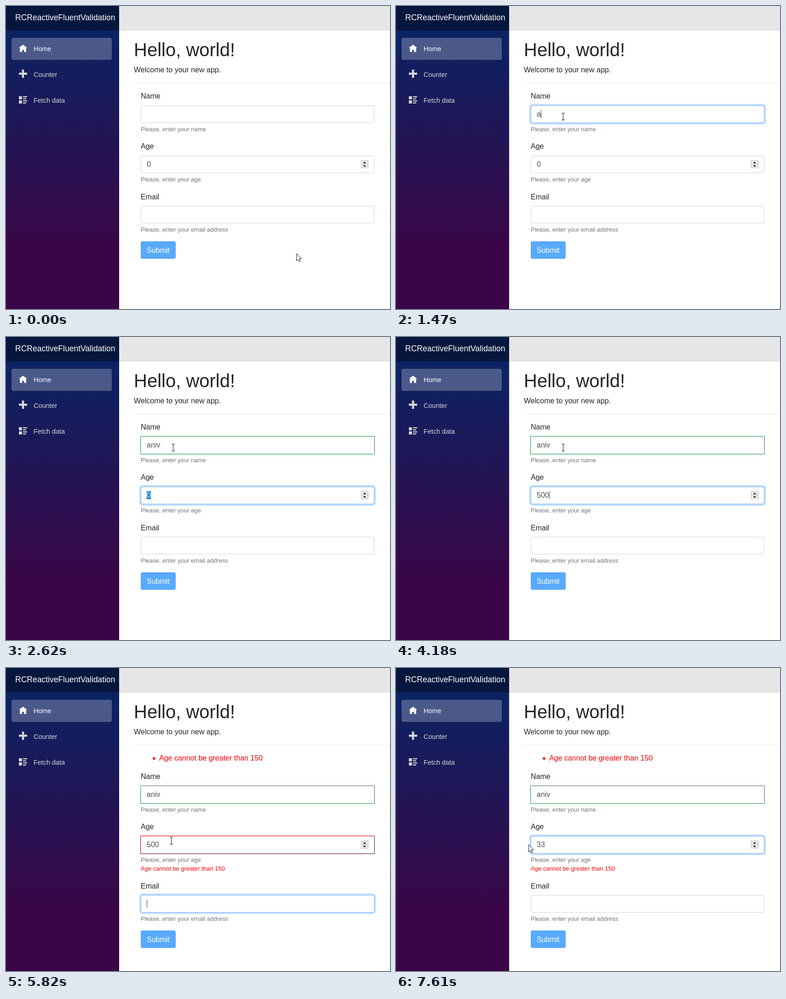
These frames come from a looping animation (835 px wide and 658 px high, 8 s). An HTML page:

```html
<!DOCTYPE html>
<html lang="en">
<head>
<meta charset="utf-8">
<title>Form validation</title>
<style>
  html, body { margin: 0; width: 100%; height: 100%; overflow: hidden; background: #fff; }
  svg { display: block; width: 835px; height: 658px; font: 16px "Liberation Sans", Arial, sans-serif; fill: #212529; }
  .small { font-size: 13px; fill: #6c757d; }
  .error { fill: red; }
  .value { fill: #495057; white-space: pre; }
  .nav { font-size: 14.4px; fill: #d7d7d7; }
  .on { fill: #fff; }
  .crisp { shape-rendering: crispEdges; }
</style>
</head>
<body>
<svg id="stage" viewBox="0 0 835 658">
  <defs>
    <linearGradient id="side" gradientUnits="userSpaceOnUse" x1="0" y1="-3" x2="0" y2="525">
      <stop stop-color="#052767"/><stop offset="1" stop-color="#3a0647"/>
    </linearGradient>
  </defs>
  <rect width="835" height="658" fill="#fff"/>
  <rect x="246" width="589" height="52" fill="#e6e6e6"/>
  <rect x="246" y="52" width="589" height="1" fill="#d6d5d5"/>
  <rect width="246" height="658" fill="url(#side)"/>
  <rect width="246" height="53" fill="#000" fill-opacity=".4"/>
  <text x="20" y="31" font-size="17.5" fill="#fff">RCReactiveFluentValidation</text>

  <rect x="12" y="69" width="218" height="48" rx="4" fill="#fff" fill-opacity=".25"/>
  <g class="nav">
    <path class="on" transform="translate(28 84) scale(2.25)" d="M4 0l-4 3h1v4h2v-2h2v2h2v-4l1 0z"/>
    <path transform="translate(28 138) scale(2.25)" d="M3 0v3h-3v2h3v3h2v-3h3v-2h-3v-3z"/>
    <path transform="translate(28 196) scale(2.25)" d="M0 0v3h3v-3zm4 0v1h4v-1zm0 2v1h3v-1zm-4 2v3h3v-3zm4 0v1h4v-1zm0 2v1h3v-1z"/>
    <text class="on" x="60" y="98">Home</text>
    <text x="60" y="154">Counter</text>
    <text x="60" y="210">Fetch data</text>
  </g>

  <text x="278" y="109" font-size="40">Hello, world!</text>
  <text x="278" y="144">Welcome to your new app.</text>
  <rect x="278" y="167" width="557" height="1" fill="#e5e5e5"/>

  <g id="summary" class="error">
    <circle cx="322" cy="196.500" r="2.800"/>
    <text x="333" y="201">Age cannot be greater than 150</text>
  </g>
  <g id="fields"></g>
  <g id="button">
    <rect x="293" y="511" width="76" height="38" rx="4" fill="#59a9ff"/>
    <text x="306" y="536" fill="#fff">Submit</text>
  </g>
  <g id="popup">
    <rect x="293" y="255" width="511" height="45" fill="#000" fill-opacity=".12"/>
    <rect x="293.5" y="254.500" width="507" height="42" fill="#fff" stroke="#c4c4c4"/>
    <text class="value" x="306" y="281">aniv</text>
  </g>
  <g id="pointer">
    <path id="arrow" fill="#fff" stroke="#14142b" d="M.5.8V16.300L4.200 12.800 6.700 18.300 9.200 17.200 6.800 11.800H11.500Z"/>
    <path id="beam" class="crisp" fill="none" stroke="#111" d="M-3-7.500H0M1-7.500H4M.5-7V8M-3 7.500H0M1 7.500H4"/>
  </g>
</svg>
<script>
const $ = id => document.getElementById(id);

function add(parent, tag, attrs, text) {
  const el = document.createElementNS("http://www.w3.org/2000/svg", tag);
  for (const k in attrs) el.setAttribute(k, attrs[k]);
  if (text) el.textContent = text;
  parent.append(el);
  return el;
}
const show = (el, on) => el.setAttribute("visibility", on ? "visible" : "hidden");

// Coordinates inside a field start at the top edge of its input box.
function makeField(label, hint, top, drop, labelY) {
  const g = add($("fields"), "g");
  add(g, "text", { x: 293, y: labelY }, label);
  const ring = add(g, "rect", { fill: "#007bff" });
  const box = { x: 293.5, y: .5, width: 507, height: 37, rx: 3.5 };
  add(g, "rect", { ...box, fill: "#fff", stroke: "#ced4da" });
  const edge = add(g, "rect", { ...box, fill: "none", stroke: "#80bdff" });
  const outline = add(g, "g", { class: "crisp", fill: "none" });
  const sides = ["M292-.5H802", "M801.5-1V39", "M292 38.5H802", "M292.500-1V39"]
    .map(d => add(outline, "path", { d }));
  const mark = add(g, "rect", { y: 10, height: 17, fill: "#0078d7", class: "crisp" });
  const value = add(g, "text", { x: 306, y: 24, class: "value" });
  const parts = [0, 1].map(i => add(value, "tspan", { fill: i ? "#fff" : "#495057" }));
  const caret = add(g, "rect", { y: 10, width: 1, height: 17, fill: "#333", class: "crisp" });
  add(g, "text", { x: 293, y: 56, class: "small" }, hint);
  return { g, top, drop, ring, edge, outline, sides, mark, value, parts, caret };
}

const fields = [
  makeField("Name", "Please, enter your name", 216, 40, -15),
  makeField("Age", "Please, enter your age", 325, 40, -15),
  makeField("Email", "Please, enter your email address", 434, 59, -14)
];

const ageBox = fields[1].g;
const spin = add(ageBox, "g", { class: "crisp" });
add(spin, "rect", { x: 772.5, y: 10.5, width: 15, height: 16, fill: "#ececec", stroke: "#b9bcc0" });
add(spin, "path", { d: "M773 18.500H787", stroke: "#b9bcc0" });
add(ageBox, "path", { d: "M776.500 16.500L779.800 13 783 16.500ZM776.500 21L779.800 24.500 783 21Z", fill: "#111" });
const ageError = add(ageBox, "text", { x: 293, y: 75, class: "small error" }, "Age cannot be greater than 150");
ageError.style.fill = "red";

// focus: ring strength per field; caret: field index or -1; selectFrom: first selected digit of the age.
const start = {
  focus: [0, 0, 0], name: "", age: "0", caret: -1, selectFrom: 9,
  popup: false, valid: false, invalid: false
};
const changes = [
  [460, { focus: [.3, 0, 0] }],
  [530, { focus: [.85, 0, 0], caret: 0 }],
  [600, { focus: [1, 0, 0] }],
  [1060, { caret: -1 }],
  [1470, { name: "a", caret: 0 }],
  [1540, { popup: true }],
  [1700, { name: "an" }],
  [1775, { popup: false }],
  [1850, { name: "ani" }],
  [2090, { name: "aniv" }],
  [2490, { focus: [.7, .3, 0], valid: true, caret: -1, selectFrom: 0 }],
  [2555, { focus: [.15, .85, 0] }],
  [2620, { focus: [0, 1, 0] }],
  [3630, { age: "5", caret: 1, selectFrom: 9 }],
  [4020, { age: "50" }],
  [4180, { age: "500" }],
  [4340, { focus: [0, .7, .3], caret: 2 }],
  [4410, { focus: [0, .15, .85], invalid: true }],
  [4480, { focus: [0, 0, 1] }],
  [4870, { caret: -1 }],
  [5270, { caret: 2 }],
  [5890, { caret: -1 }],
  [5970, { focus: [0, .3, .7], caret: 1 }],
  [6050, { focus: [0, .85, .15] }],
  [6120, { focus: [0, 1, 0] }],
  [6200, { selectFrom: 1, caret: -1 }],
  [6280, { selectFrom: 0 }],
  [7450, { age: "3", selectFrom: 9 }],
  [7610, { age: "33" }]
];

// time, x, y, and 1 for the text beam
const moves = [
  [0, 631, 537], [70, 598, 488], [147, 500, 367], [223, 402, 266, 1], [300, 363, 240, 1],
  [4480, 361, 239],
  [5270, 361, 245], [5350, 361, 262, 1], [5430, 361, 288, 1], [5510, 360, 318],
  [5590, 360, 345], [5660, 359, 363], [5740, 359, 372, 1], [5820, 359, 375, 1],
  [6050, 352, 375, 1], [6120, 336, 375, 1], [6200, 314, 375, 1], [6280, 286, 375],
  [6360, 270, 375], [6590, 282, 380], [6910, 287, 382], [7070, 288, 383]
];

function drawField(f, i, s) {
  const level = s.focus[i], spread = 3.2 * level;
  f.g.setAttribute("transform", `translate(0 ${f.top + (s.invalid ? f.drop : 0)})`);
  const ring = {
    x: 293 - spread, y: -spread, width: 508 + 2 * spread, height: 38 + 2 * spread,
    rx: 4 + spread, "fill-opacity": level / 4
  };
  for (const k in ring) f.ring.setAttribute(k, ring[k]);
  f.edge.setAttribute("opacity", level);

  const text = [s.name, s.age, ""][i];
  const from = i === 1 ? Math.min(s.selectFrom, text.length) : text.length;
  f.parts[0].textContent = text.slice(0, from);
  f.parts[1].textContent = text.slice(from);
  const end = text ? f.value.getComputedTextLength() : 0;
  const left = text ? end * from / text.length : 0;
  f.mark.setAttribute("x", 306 + left);
  f.mark.setAttribute("width", end - left);
  f.caret.setAttribute("x", Math.round(306 + end));
  show(f.caret, s.caret === i);

  const good = i === 0 && s.valid;
  const bad = i === 1 && s.invalid && level === 0;
  const colors = good
    ? [s.invalid ? "#6a8a8a" : "#26b050", "#5d7a94", "#26b050", "#26b050"]
    : ["#f00", "#3c3a5c", "#8a1c30", "#f00"];
  f.sides.forEach((side, n) => side.setAttribute("stroke", colors[n]));
  show(f.outline, good || bad);
}

function draw(t) {
  const s = Object.assign({}, start, ...changes.filter(c => c[0] <= t).map(c => c[1]));
  fields.forEach((f, i) => drawField(f, i, s));
  show($("summary"), s.invalid);
  show(ageError, s.invalid);
  show($("popup"), s.popup);
  $("button").setAttribute("transform", `translate(0 ${s.invalid ? 59 : 0})`);

  const [, x, y, beam] = moves.filter(m => m[0] <= t).pop();
  $("pointer").setAttribute("transform", `translate(${x} ${y})`);
  show($("beam"), beam);
  show($("arrow"), !beam);
}

const origin = performance.now();
function tick() {
  draw((performance.now() - origin) % 8000);
  requestAnimationFrame(tick);
}
tick();
</script>
</body>
</html>
```
